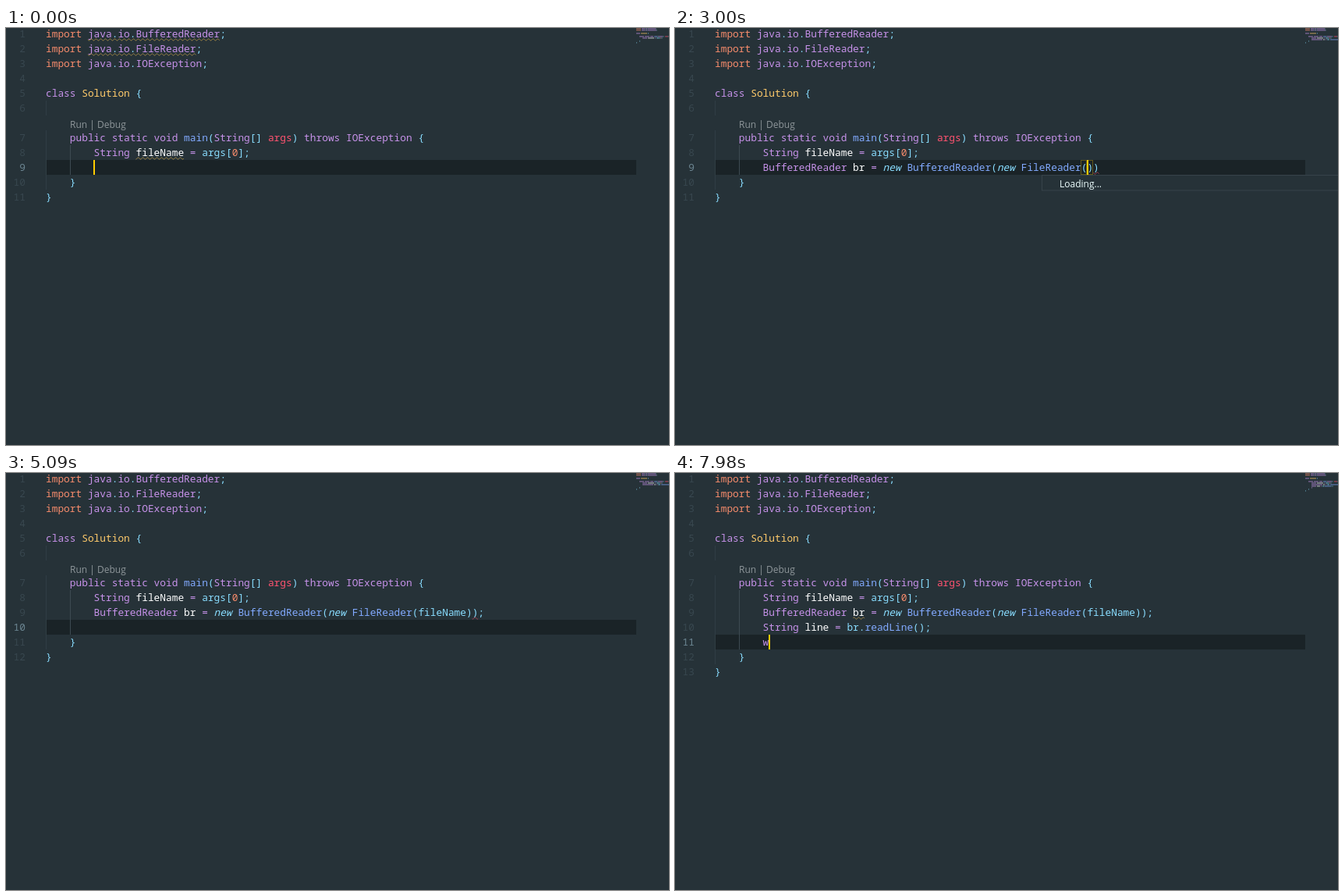
Recreate the animation shown at these times as an HTML page with a canvas. Size 850 by 534 pixels, loop 8 s.

```html
<!DOCTYPE html>
<html lang="en">
<head>
<meta charset="utf-8">
<title>Java editor</title>
<style>
html, body { margin: 0; width: 100%; height: 100%; overflow: hidden; background: #263238; }
canvas { display: block; width: 850px; height: 534px; }
</style>
</head>
<body>
<canvas id="stage" width="850" height="534"></canvas>
<script>
const ctx = document.getElementById('stage').getContext('2d');
const W = 850, H = 534, LOOP = 8000;
const LEFT = 51, CH = 7.7, ROW = 19, MAP = 808;
const MONO = '12.83px "Noto Sans Mono", "DejaVu Sans Mono", monospace';
const SANS = '12px "Open Sans", "Noto Sans", sans-serif';
const BG = '#263238', SHADE = 'rgba(0,0,0,.31)', YELLOW = '#ffcc00', BORDER = '#37434a';
const WARN = '#a68b48', ERROR = '#b04558';
const INK = {
  o: '#f78c6c', p: '#c792ea', c: '#89ddff', y: '#ffcb6b',
  b: '#82aaff', r: '#ff5370', w: '#ffffff', n: '#89ddff'
};

// Marked-up code: ~ plus a colour letter starts a run (n is italic).
const parse = src => src.split('~').slice(1).map(s => [s[0], s.slice(1)]);
const imp = name => parse(`~oimport ~pjava~c.~pio~c.~p${name}~c;`);
const head = [
  imp('BufferedReader'), imp('FileReader'), imp('IOException'), [],
  parse('~pclass ~ySolution ~c{'), [],
  parse('~w    ~ppublic static void ~bmain~c(~pString~c[] ~rargs~c) ~pthrows IOException ~c{'),
  parse('~w        ~pString ~wfileName ~p= ~cargs[~o0~c];')
];
const reader = arg =>
  parse(`~w        ~pBufferedReader ~wbr ~p= ~nnew ~bBufferedReader~c(${arg}`);
const fileReader = tail => reader('~nnew ~bFileReader~c(' + tail);
const readLine = parse('~w        ~pString ~wline ~p= ~cbr.~breadLine~c();');
const done = fileReader('fileName));');
const typedW = parse('~w        ~pw');

// Completion rows: icon letter, optional star, label.
const scopeRows = ['vargs : String[]', 'vfileName : String'];
const tailRows = ['mmain(String[] args) : void', 'iSolution', 'kclass',
  's#endregion', 's#region', 'sctor', 'sdowhile', 'sforeach'];
const listA = ['s*BufferedReader br = new BufferedReader()', ...scopeRows, ...tailRows, 'sfori'];
const listB = ['m*new FileReader()', 'm*new InputStreamReader()', ...scopeRows, 'knew'];
const listC = ['v*fileName', ...scopeRows, ...tailRows.slice(0, 4)];
const listD = ['s*String line = br.readLine();', scopeRows[0],
  'vbr : BufferedReader', scopeRows[1], ...tailRows];
const popup = (x, rows) => ({ x, rows });

const start = {
  body: [[]], line: 9, col: 8, on: true, pop: null, match: [], bulb: false,
  imports: true, br: false, err: 0
};
const steps = [
  [290, { on: false }],
  [670, { pop: popup(113) }],
  [790, { on: true }],
  [880, { pop: popup(113, listA) }],
  [1290, { on: false }],
  [1590, { body: [reader(')')], col: 47, on: true, pop: null, match: [46, 47] }],
  [1990, { bulb: true }],
  [2060, { on: false, pop: popup(413) }],
  [2140, { pop: popup(413, listB) }],
  [2560, { on: true }],
  [2690, { body: [fileReader('))')], col: 62, pop: null, match: [61, 62],
    bulb: false, imports: false, err: 63 }],
  [3000, { pop: popup(470) }],
  [3150, { pop: popup(470, listC) }],
  [3310, { body: [fileReader('fileName))')], col: 70, pop: null, match: [61, 70], err: 71 }],
  [3460, { bulb: true }],
  [3540, { col: 71, bulb: false }],
  [3840, { col: 72, match: [46, 71] }],
  [4320, { body: [done], col: 73, match: [] }],
  [4590, { body: [done, []], line: 10, col: 8 }],
  [5090, { on: false }],
  [5410, { err: 0, br: true }],
  [5560, { on: true }],
  [6040, { on: false, pop: popup(113) }],
  [6340, { pop: popup(113, listD) }],
  [6580, { on: true }],
  [7050, { body: [done, readLine], col: 36, pop: null }],
  [7450, { body: [done, readLine, []], line: 11, col: 8 }],
  [7980, { body: [done, readLine, typedW], col: 9 }]
];

const colX = col => LEFT + col * CH;
const lineY = n => -2 + ROW * (n - 1) + (n > 6 ? ROW : 0);

function rect(x, y, w, h, color) {
  ctx.fillStyle = color;
  ctx.fillRect(x, y, w, h);
}

function text(str, x, y, color, font = MONO) {
  ctx.font = font;
  ctx.fillStyle = color;
  ctx.fillText(str, x, y);
}

function poly(points, fill, stroke) {
  ctx.beginPath();
  points.forEach(([x, y]) => ctx.lineTo(x, y));
  ctx.closePath();
  if (fill) { ctx.fillStyle = fill; ctx.fill(); }
  if (stroke) { ctx.strokeStyle = stroke; ctx.stroke(); }
}

function circle(x, y, r, fill, stroke) {
  ctx.beginPath();
  ctx.arc(x, y, r, 0, Math.PI * 2);
  if (fill) { ctx.fillStyle = fill; ctx.fill(); }
  if (stroke) { ctx.strokeStyle = stroke; ctx.stroke(); }
}

function segment(x1, y1, x2, y2, color) {
  ctx.strokeStyle = color;
  ctx.beginPath();
  ctx.moveTo(x1, y1);
  ctx.lineTo(x2, y2);
  ctx.stroke();
}

function squiggle(line, col, len, color) {
  const x0 = colX(col), x1 = colX(col + len), y = lineY(line) + 17;
  ctx.strokeStyle = color;
  ctx.beginPath();
  for (let x = x0; x <= x1; x += 0.5) ctx.lineTo(x, y - 1.1 * Math.sin(x * Math.PI / 3));
  ctx.stroke();
}

function drawCode(runs, n) {
  let col = 0;
  for (const [ink, str] of runs) {
    text(str, colX(col), lineY(n) + 14, INK[ink], (ink === 'n' ? 'italic ' : '') + MONO);
    col += str.length;
  }
}

function drawMap(runs, n) {
  let x = MAP;
  const y = 2 * n - 4;
  for (const [ink, str] of runs) {
    for (const ch of str) {
      if (ch !== ' ') {
        ctx.globalAlpha = /[.;,()[\]]/.test(ch) ? 0.22 : 0.42;
        rect(x, y, 1, 1, INK[ink]);
        ctx.globalAlpha *= 0.7;
        rect(x, y + 1, 1, 1, INK[ink]);
      }
      x++;
    }
  }
  ctx.globalAlpha = 1;
}

function drawBulb(y) {
  circle(62, y + 5.5, 4, '#3b3a24', YELLOW);
  circle(62, y + 5.5, 3.4, null, YELLOW);
  segment(60.5, y + 5, 63.5, y + 5, YELLOW);
  segment(62, y + 5, 62, y + 10, YELLOW);
  rect(60, y + 9, 4, 4, YELLOW);
  rect(60, y + 11, 4, 1, '#3b3a24');
  rect(61, y + 13, 2, 2, YELLOW);
}

// Icons sit in a 13 px box whose left top is the origin.
const icons = {
  s() {
    const grey = '#c5cbce';
    rect(0, 0, 12, 1.4, grey);
    rect(0, 0, 1, 12, grey);
    rect(11, 0, 1, 12, grey);
    for (let x = 0; x < 12; x += 2) rect(x, 12, 1, 1, grey);
  },
  v() {
    const amber = '#f0a33a';
    poly([[0, 3], [4, 0], [7, 3], [3, 6.5]], amber);
    poly([[7, 8], [10, 5.5], [13, 8], [10, 11]], amber);
    segment(5, 4, 9, 4, amber);
    segment(4.5, 5, 4.5, 9.5, amber);
    segment(4.5, 9.5, 8, 9.5, amber);
  },
  m() {
    const violet = '#b180d7';
    poly([[6, 0], [11.5, 3], [11.5, 9.5], [6, 12.5], [0.5, 9.5], [0.5, 3]], null, violet);
    segment(0.5, 3, 6, 6, violet);
    segment(11.5, 3, 6, 6, violet);
    segment(6, 6, 6, 12.5, violet);
  },
  i() {
    const blue = '#75beff';
    circle(1.8, 6.5, 2, blue);
    segment(3, 6.5, 7, 6.5, blue);
    ctx.lineWidth = 1.6;
    circle(9.7, 6.5, 2.7, null, blue);
    ctx.lineWidth = 1;
  },
  k() {
    circle(6.3, 6.3, 5.8, '#30383d', '#d4d7d6');
    circle(3.4, 4.8, 1.1, '#d4d7d6');
    circle(6.8, 3, 1.1, '#d4d7d6');
    circle(9.6, 5.4, 1.1, '#d4d7d6');
    circle(9.2, 8.8, 1.1, '#d4d7d6');
    poly([[0, 8], [5, 7], [6, 12.5], [2, 11.5]], '#d4d7d6');
    circle(2.3, 10.3, 2.1, BG);
  }
};

function drawStar(cx, cy) {
  const pts = [];
  for (let i = 0; i < 10; i++) {
    const r = i % 2 ? 2.8 : 6.8, a = (i / 5 - 0.5) * Math.PI;
    pts.push([cx + r * Math.cos(a), cy + r * Math.sin(a)]);
  }
  poly(pts, '#ffc83d');
}

function drawPopup({ x, rows }, y) {
  const h = rows ? rows.length * ROW : 20;
  rect(x, y, 430, h, BG);
  ctx.strokeStyle = BORDER;
  ctx.strokeRect(x + 0.5, y + 0.5, 429, h - 0.5);
  if (!rows) {
    text('Loading...', x + 23, y + 16, '#eeffff', '500 ' + SANS);
    return;
  }
  rect(x + 1, y + 1, 428, ROW, SHADE);
  rows.forEach((row, i) => {
    const top = y + 1 + i * ROW, star = row[1] === '*';
    ctx.save();
    ctx.translate(x + 8, top + 3);
    icons[row[0]]();
    ctx.restore();
    if (star) drawStar(x + 34.5, top + 9.5);
    text(row.slice(star ? 2 : 1), x + (star ? 44 : 25), top + 14, '#eeffff', '500 ' + MONO);
  });
}

function stateAt(t) {
  const state = { ...start };
  for (const [at, patch] of steps) if (t >= at) Object.assign(state, patch);
  return state;
}

function draw(t) {
  const s = stateAt(t);
  const lines = [...head, ...s.body, parse('~w    ~c}'), parse('~c}')];
  const last = lines.length, top = lineY(s.line);
  rect(0, 0, W, H, BG);
  ctx.lineWidth = 1;
  rect(LEFT, top, MAP - LEFT, ROW, SHADE);

  rect(LEFT, lineY(6), 1, ROW, '#303d44');
  rect(LEFT, lineY(7), 1, lineY(last) - lineY(7), '#303d44');
  rect(82, lineY(8), 1, lineY(last - 1) - lineY(8), '#3c4a51');

  text('Run | Debug', 82, 128, '#8f979b', SANS);
  lines.forEach((runs, i) => {
    const n = i + 1;
    ctx.textAlign = 'right';
    text(n, 25, lineY(n) + 14, n === s.line ? '#6c8692' : '#38474f');
    ctx.textAlign = 'left';
    drawCode(runs, n);
    drawMap(runs, n);
  });

  if (s.imports) {
    squiggle(1, 7, 22, WARN);
    squiggle(2, 7, 18, WARN);
    squiggle(8, 15, 8, WARN);
  }
  if (s.br) squiggle(9, 23, 2, WARN);
  if (s.err) squiggle(9, s.err, 1, ERROR);

  ctx.strokeStyle = 'rgba(255,204,0,.31)';
  for (const col of s.match) ctx.strokeRect(Math.floor(colX(col)) + 0.5, top + 0.5, 7, 18);
  if (s.bulb) drawBulb(top);
  if (s.on) rect(Math.floor(colX(s.col)), top, 2, ROW, YELLOW);
  if (s.pop) drawPopup(s.pop, top + ROW);
}

function tick() {
  draw(performance.now() % LOOP);
  requestAnimationFrame(tick);
}
tick();
</script>
</body>
</html>
```
